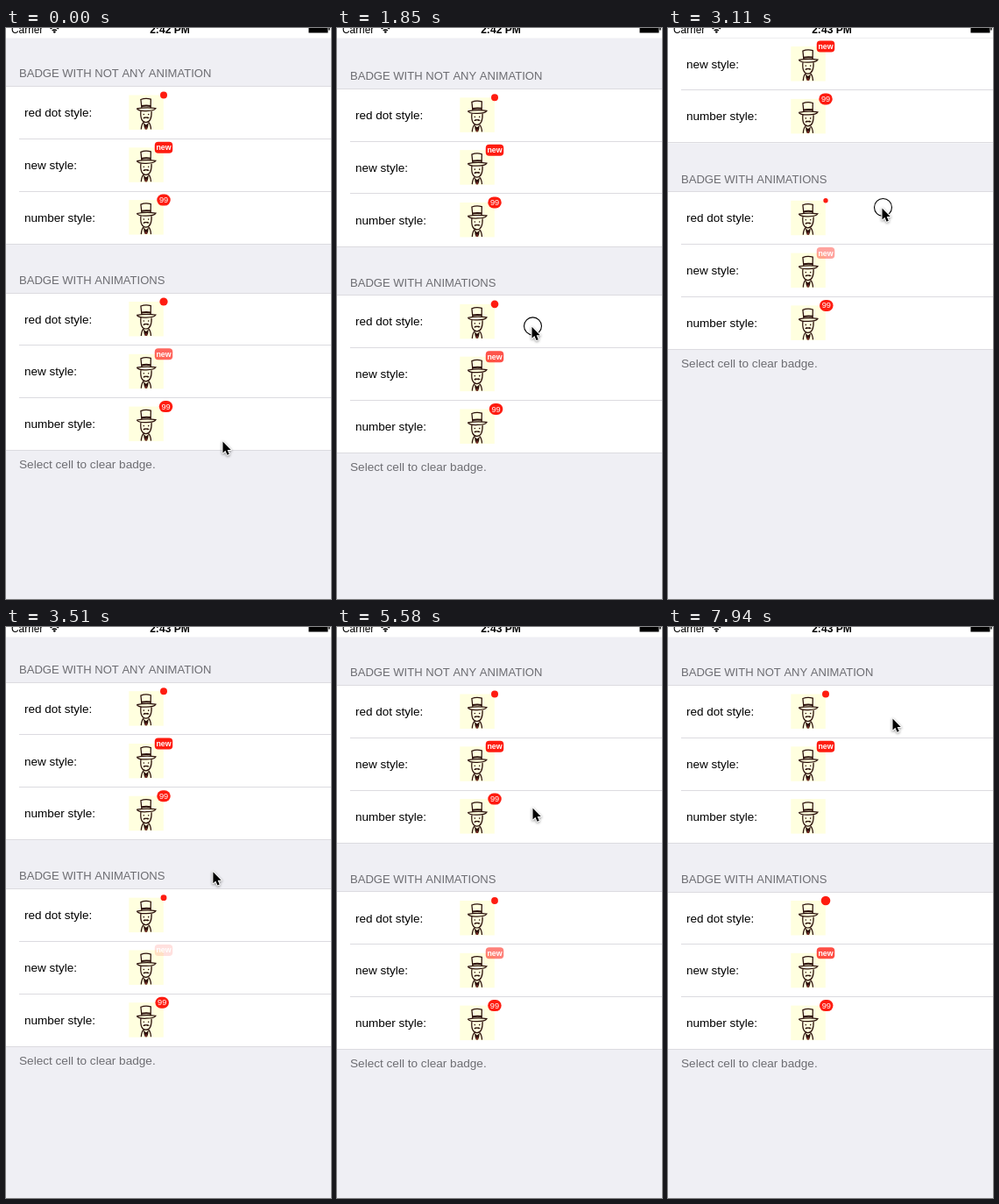
Recreate the animation shown at these times as an HTML page with a canvas. Size 371 by 651 pixels, loop 7990 ms.

```html
<!DOCTYPE html>
<html lang="en">
<head>
<meta charset="utf-8">
<title>Badge styles</title>
<style>
  html, body { margin: 0; width: 100%; height: 100%; overflow: hidden; background: #efeff4; }
  canvas { display: block; width: 371px; height: 651px; }
</style>
</head>
<body>
<canvas id="stage"></canvas>
<script>
const W = 371, H = 651, LOOP = 7990;
const RED = '#fe1c10', INK = '#2b100b', LINE = '#dcdbe0', GREY = '#6d6d72';
const SANS = '"Liberation Sans", Arial, sans-serif';
const ROWS = ['red dot style:', 'new style:', 'number style:'];
const MINUTE_CHANGE = 2900;

// Where the pointer pauses or turns
const STOPS = [
  { t: 0, x: 247, y: 470 },
  { t: 810, x: 232, y: 533 },
  { t: 1150, x: 228, y: 517 },
  { t: 1390, x: 227, y: 492 },
  { t: 1800, x: 222, y: 333 },
  { t: 2290, x: 222, y: 543 },
  { t: 2410, x: 222, y: 543 },
  { t: 3110, x: 244, y: 204 },
  { t: 4140, x: 220, y: 423 },
  { t: 4500, x: 258, y: 330 },
  { t: 5580, x: 223, y: 205 },
  { t: 6100, x: 289, y: 186 },
  { t: 6510, x: 257, y: 170 },
  { t: 7250, x: 256, y: 103 }
];
const DRAGS = [
  { from: 1150, to: 1480 },
  { from: 1800, to: 2293 },
  { from: 2638, to: 3150 }
];
const TAP = { from: 5610, to: 5670 };

const dpr = window.devicePixelRatio || 1;
const canvas = document.getElementById('stage');
const ctx = canvas.getContext('2d');
canvas.width = W * dpr;
canvas.height = H * dpr;

const during = (t, span) => t >= span.from && t < span.to;

function pointerAt(t) {
  const i = STOPS.findIndex(stop => stop.t > t);
  if (i < 0) return STOPS[STOPS.length - 1];
  const a = STOPS[i - 1], b = STOPS[i];
  const p = (t - a.t) / (b.t - a.t);
  const eased = p * p * (3 - 2 * p);
  return { x: a.x + (b.x - a.x) * eased, y: a.y + (b.y - a.y) * eased };
}

// The table resists being pulled past its edge ...
const rubberBand = d => Math.sign(d) * H * (1 - 1 / (Math.abs(d) * 0.55 / H + 1));
// ... and springs back, critically damped, once released
const springBack = ms => (1 + ms / 67) * Math.exp(-ms / 67);

function scrollAt(t) {
  return DRAGS.filter(drag => t >= drag.from).reduce((sum, { from, to }) => {
    const pulled = pointerAt(Math.min(t, to)).y - pointerAt(from).y;
    return sum + rubberBand(pulled) * springBack(Math.max(0, t - to));
  }, 0);
}

// Linear back-and-forth between 1 (at the peak time) and 0
function swing(t, period, peak) {
  const p = (((t - peak) / period) % 1 + 1) % 1;
  return Math.abs(1 - 2 * p);
}

function rect(x, y, w, h, color) {
  ctx.fillStyle = color;
  ctx.fillRect(x, y, w, h);
}

function text(str, x, y, size, color, align = 'left', weight = '') {
  ctx.font = `${weight} ${size}px ${SANS}`;
  ctx.textAlign = align;
  ctx.fillStyle = color;
  ctx.fillText(str, x, y);
}

function disc(x, y, r, color) {
  ctx.fillStyle = color;
  ctx.beginPath();
  ctx.arc(x, y, r, 0, 7);
  ctx.fill();
}

function pill(x, y, w, radius, alpha = 1) {
  ctx.globalAlpha = alpha;
  ctx.fillStyle = RED;
  ctx.beginPath();
  ctx.roundRect(x - w / 2, y - 6.5, w, 13, radius);
  ctx.fill();
  ctx.globalAlpha = 1;
}

const dotBadge = (x, y, scale = 1) => disc(x, y, 4 * scale, RED);

function newBadge(x, y, alpha) {
  pill(x, y, 20.5, 4, alpha);
  text('new', x, y + 3, 8.8, '#fff', 'center', 'bold');
}

function numberBadge(x, y) {
  pill(x, y, 15.5, 6.5);
  text('99', x, y + 3.1, 9.2, '#fff', 'center');
}

const MAN = {
  outline: new Path2D('M14.6 14.5L13.6 5Q19 2.8 25 4.6L24.8 14.5M9 15.4Q20 13.4 30.6 15' +
    'Q29 18 20 18Q11 18.4 9 15.4M13.6 18.4Q12.6 30.6 19.4 31Q26.2 30.6 25.8 18.4' +
    'M16.8 31Q14.4 33 14 39M22.4 31Q24.8 33 25.2 39'),
  band: new Path2D('M14.2 11.6Q19 10.6 25 11.4L25 13.4Q19 12.6 14.4 13.6Z'),
  moustache: new Path2D('M19.6 25Q17.6 24 15.8 26.4Q18 27.2 19.6 26Q21.4 27.2 23.6 26.2Q21.6 24 19.6 25Z'),
  lapels: new Path2D('M16.8 31.5L19.6 34L22.4 31.5Q22.4 36 20.8 39L18.4 39Q16.8 36 16.8 31.5Z'),
  tie: new Path2D('M19.2 36L20 36L20.3 39L18.9 39Z')
};

function portrait(x, y) {
  ctx.save();
  ctx.translate(x, y);
  rect(0, 0, 39.5, 39.5, '#ffffdf');
  ctx.strokeStyle = INK;
  ctx.lineWidth = 1.25;
  ctx.stroke(MAN.outline);
  ctx.fillStyle = INK;
  for (const part of ['band', 'moustache', 'lapels']) ctx.fill(MAN[part]);
  ctx.fillStyle = '#a33c35';
  ctx.fill(MAN.tie);
  disc(17, 22, 0.8, INK);
  disc(22.4, 22, 0.8, INK);
  ctx.restore();
}

function section(title, top, badges, selected) {
  text(title, 15, top - 10.2, 13.05, GREY);
  rect(0, top, W, 180, '#fff');
  ROWS.forEach((name, i) => {
    const y = top + i * 59.8;
    if (i === selected) rect(0, y, W, 60, '#d9d9d9');
    if (i) rect(15, Math.round(y - 0.5), W, 1, LINE);
    text(name, 21, y + 34.6, 13.5, '#000');
    portrait(140.3, y + 10);
    badges[i](180, y + 10);
  });
  rect(0, Math.round(top - 0.5), W, 1, LINE);
  rect(0, Math.round(top + 179.2), W, 1, LINE);
}

function statusBar(t) {
  rect(0, 0, W, 11.5, '#fff');
  text('Carrier', 6, 5.6, 11.9, '#000');
  text(t < MINUTE_CHANGE ? '2:42 PM' : '2:43 PM', 187, 5.6, 12.1, '#000', 'center', 'bold');
  ctx.strokeStyle = '#000';
  ctx.lineWidth = 1.6;
  for (const r of [3.6, 6.6]) {
    ctx.beginPath();
    ctx.arc(55.3, 5.6, r, -2.35, -0.79);
    ctx.stroke();
  }
  disc(55.3, 4.5, 1.3, '#000');
  rect(345.5, -2, 22, 7.5, '#000');
  rect(368.3, -2, 1.4, 4.5, '#000');
}

const ARROW = new Path2D('M0 0V13L2.9 10.2L5.1 15.2L7.3 14.3L5.2 9.4H9.3Z');

function pointer(t) {
  const { x, y } = pointerAt(t);
  ctx.save();
  ctx.translate(x + 0.5, y + 1.5);
  if ([...DRAGS, TAP].some(span => during(t, span))) {
    ctx.strokeStyle = '#000';
    ctx.lineWidth = 1.1;
    ctx.beginPath();
    ctx.arc(1, -1, 10, 0, 7);
    ctx.stroke();
  }
  ctx.lineWidth = 2;
  ctx.lineJoin = 'round';
  ctx.strokeStyle = '#fff';
  ctx.shadowColor = 'rgba(0,0,0,.45)';
  ctx.shadowBlur = 3 * dpr;
  ctx.shadowOffsetY = dpr;
  ctx.stroke(ARROW);
  ctx.shadowColor = 'transparent';
  ctx.fillStyle = '#000';
  ctx.fill(ARROW);
  ctx.restore();
}

function draw(t) {
  const offset = scrollAt(t);
  ctx.setTransform(dpr, 0, 0, dpr, 0, 0);
  rect(0, 0, W, H, '#efeff4');

  const still = [
    (x, y) => dotBadge(x, y),
    (x, y) => newBadge(x, y, 1),
    (x, y) => { if (t < TAP.to) numberBadge(x, y); }
  ];
  const moving = [
    (x, y) => dotBadge(x, y, 0.6 + 0.8 * swing(t, 1930, 300)),
    (x, y) => newBadge(x, y, 0.1 + 0.9 * swing(t, 2700, 2215)),
    (x, y) => numberBadge(x - 3 + 6 * swing(t, 965, 40), y)
  ];
  section('BADGE WITH NOT ANY ANIMATION', 66.5 + offset, still, during(t, TAP) ? 2 : -1);
  section('BADGE WITH ANIMATIONS', 302 + offset, moving, -1);
  text('Select cell to clear badge.', 15, 502 + offset, 13.6, GREY);
  statusBar(t);
  pointer(t);
}

const start = performance.now();
function frame() {
  draw((performance.now() - start) % LOOP);
  requestAnimationFrame(frame);
}
frame();
</script>
</body>
</html>
```
